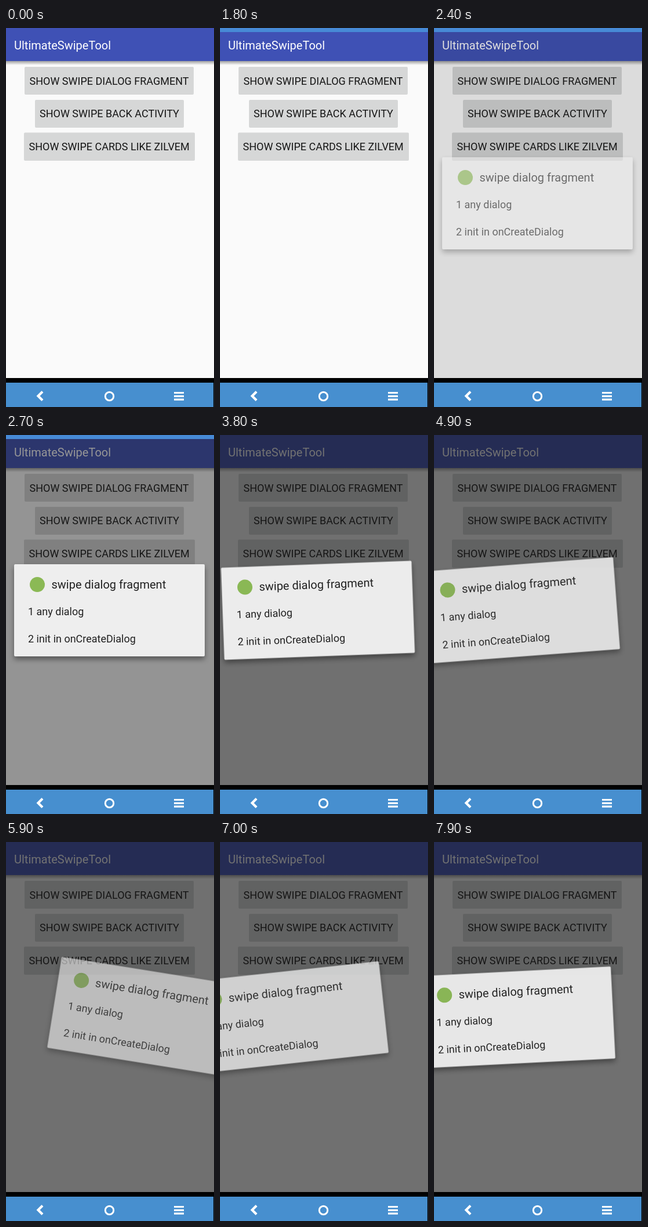
An HTML page for the animation above (8 s loop, 359 by 654 pixels).

```html
<!DOCTYPE html>
<html lang="en">
<head>
<meta charset="utf-8">
<style>
  html, body { margin: 0; width: 359px; height: 654px; overflow: hidden; background: #fafafa; }
  svg { display: block; font: 18px Roboto, sans-serif; fill: #151515; }
  .title { font-size: 20px; }
  .card { filter: drop-shadow(0 5px 5px rgba(0, 0, 0, .42)); }
</style>
</head>
<body>
<svg width="359" height="654" viewBox="0 0 359 654">
  <defs>
    <linearGradient id="fade" x2="0" y2="1">
      <stop stop-opacity=".36"/>
      <stop offset="1" stop-opacity="0"/>
    </linearGradient>
  </defs>

  <rect width="359" height="654" fill="#fafafa"/>
  <rect y="57" width="359" height="7" fill="url(#fade)"/>
  <rect width="359" height="57" fill="#3f51b5"/>
  <text class="title" x="14" y="37" fill="#fff">UltimateSwipeTool</text>

  <g fill="#d6d7d7">
    <rect x="32" y="67" width="292" height="48" rx="2"/>
    <rect x="50" y="124" width="257" height="48" rx="2"/>
    <rect x="31" y="180.5" width="295" height="48.5" rx="2"/>
  </g>
  <text x="40.5" y="97.5">SHOW SWIPE DIALOG FRAGMENT</text>
  <text x="58" y="154">SHOW SWIPE BACK ACTIVITY</text>
  <text x="39.5" y="211">SHOW SWIPE CARDS LIKE ZILVEM</text>

  <rect id="dim" width="359" height="604"/>
  <rect id="strip" width="359" height="7" fill="#478ad6"/>

  <!-- dialog, drawn around its own centre -->
  <g id="dialog">
    <rect class="card" x="-164.5" y="-79.5" width="329" height="159" rx="2" fill="#eee"/>
    <circle cx="-124.5" cy="-44.5" r="13" fill="#8bb955"/>
    <g fill="#212121">
      <text class="title" x="-100" y="-37.5">swipe dialog fragment</text>
      <text x="-140.5" y="8.5">1 any dialog</text>
      <text x="-140.5" y="55.5">2 init in onCreateDialog</text>
    </g>
  </g>

  <rect y="604" width="359" height="50" fill="#000"/>
  <rect y="612" width="358" height="42" fill="#478fcf"/>
  <g fill="none" stroke="#fff">
    <path d="M63 627.5L55.5 635L63 642.5" stroke-width="4.2"/>
    <circle cx="178.5" cy="635.5" r="7.2" stroke-width="3"/>
    <path d="M290 629.5h17m-17 5.8h17m-17 5.8h17" stroke-width="3.2"/>
  </g>
</svg>
<script>
  const LOOP = 8000, STEP = 100;
  const CENTER = [178.5, 302.5];

  // time, centre x, tilt in degrees
  const poses = [
    [0, CENTER[0], 0], [3300, CENTER[0], 0],
    [3800, 169, -2.1], [4100, 117, -7], [4200, 117, -7],
    [4500, 97, -9.2], [4600, 97, -9.2],
    [4900, 151, -4.3], [5100, 200, 1.5], [5200, 200, 1.5],
    [5900, 246, 9.1], [6200, 246, 9.1],
    [7000, 119, -6.2], [7300, 119, -6.2],
    [7900, 144.7, -2.9]
  ];

  const [dim, strip, dialog] = ['dim', 'strip', 'dialog'].map(id => document.getElementById(id));
  const clamp = v => Math.min(1, Math.max(0, v));

  function poseAt(t) {
    const i = Math.max(1, poses.findIndex(p => p[0] >= t));
    const [a, b] = [poses[i - 1], poses[i]];
    const f = (t - a[0]) / (b[0] - a[0]);
    return [1, 2].map(n => a[n] + (b[n] - a[n]) * f);
  }

  function draw(now) {
    const t = Math.floor(now % LOOP / STEP) * STEP;
    const enter = clamp((t - 2000) / 800);
    const [x, tilt] = poseAt(t);

    dim.setAttribute('opacity', 0.6 * enter ** 2.2);
    strip.setAttribute('visibility', t >= 1500 && t < 3400 ? 'visible' : 'hidden');
    // the dialog fades as it tilts away
    dialog.setAttribute('opacity', clamp(enter * 1.2) * clamp(1.105 - Math.abs(tilt) * 0.055));
    dialog.setAttribute('transform', `translate(${x} ${CENTER[1]}) rotate(${tilt})`);
  }

  const start = performance.now();
  function tick() {
    draw(performance.now() - start);
    requestAnimationFrame(tick);
  }
  tick();
</script>
</body>
</html>
```
